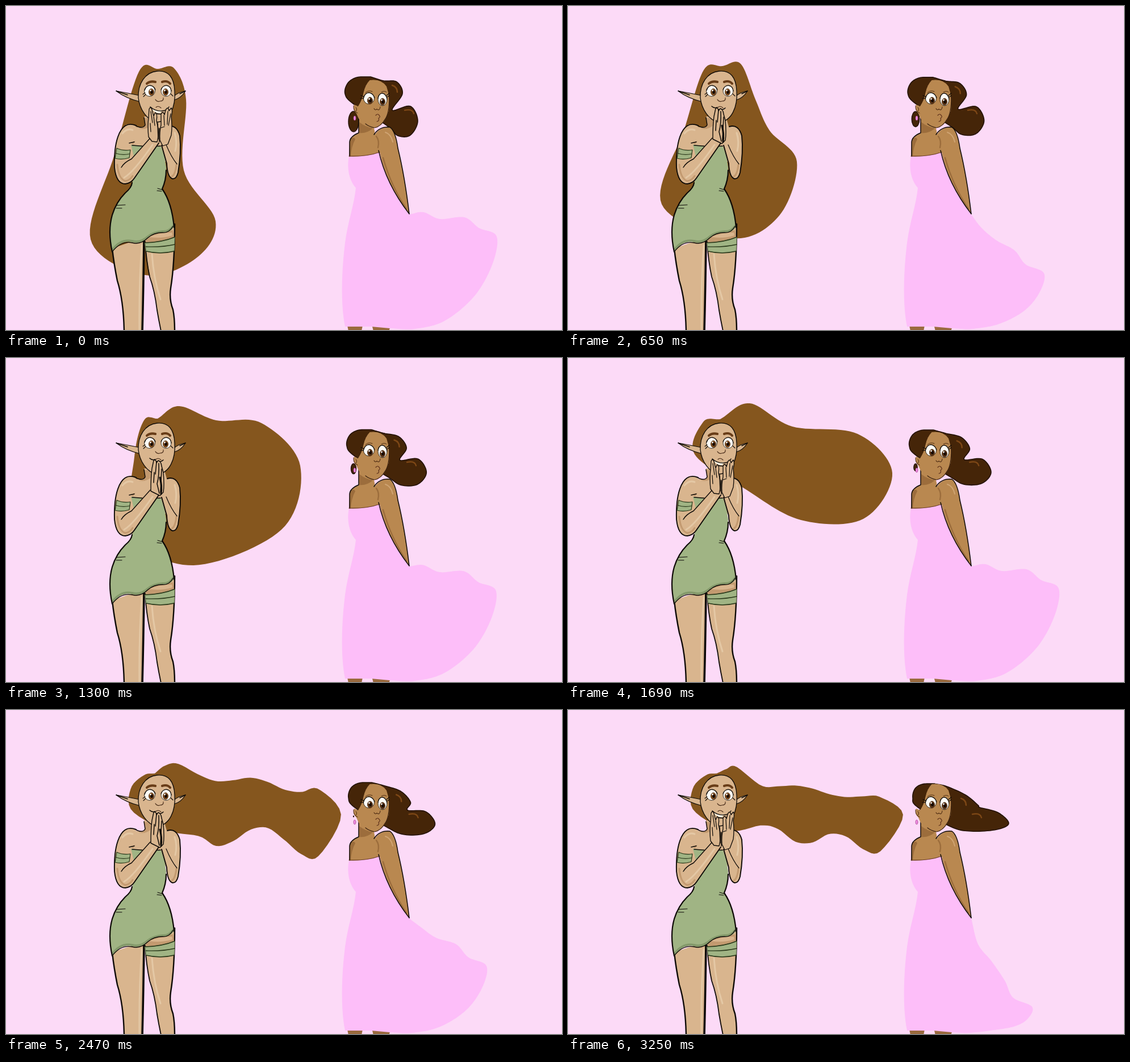
Animation of 979x572 px, one loop 3.38 s. Source, as an HTML page with a canvas:

```html
<!DOCTYPE html>
<html lang="en">
<head>
<meta charset="utf-8">
<title>Windblown</title>
<style>
html, body { margin: 0; width: 100%; height: 100%; overflow: hidden; background: #fcdaf7; }
canvas { display: block; }
</style>
</head>
<body>
<canvas id="stage" width="979" height="572"></canvas>
<script>
const ctx = document.getElementById('stage').getContext('2d');
const STEP = 130, STEPS = 26, TAU = 2 * Math.PI;
const INK = '#0d0906', SKIN = '#d9b58e', SKIN_LIGHT = '#e4c8a5', SKIN_DARK = '#c39a70';
const GREEN = '#a0b484', GREEN_DARK = '#83996a', HAIR = '#85561e';
const TAN = '#b98850', TAN_DARK = '#9c6d3c', TAN_SHINE = '#cfa473';
const CURLS = '#452508', CURLS_INK = '#211003', SHINE = '#7d4716', GOWN = '#fdbef9';

const mix = (a, b, k) => a + (b - a) * k;
const mixPoints = (a, b, k) => a.map((p, i) => [mix(p[0], b[i][0], k), mix(p[1], b[i][1], k)]);
const ease = k => (1 - Math.cos(Math.PI * k)) / 2;
const points = text => text.split(' ').map(pair => pair.split(',').map(Number));

// Value at a time between [time, value] keys.
function between(keys, time, blend) {
  const i = Math.max(1, keys.findIndex(key => key[0] >= time));
  const [t0, a] = keys[i - 1], [t1, b] = keys[i];
  return blend(a, b, (time - t0) / (t1 - t0));
}

// Evenly samples a smooth curve through the given points.
function smooth(pts, samples = 140) {
  const last = pts.length - 1;
  return Array.from({ length: samples + 1 }, (_, n) => {
    const pos = n / samples * last, i = Math.min(last - 1, Math.floor(pos)), k = pos - i;
    const q = pts[i], r = pts[i + 1];
    const p = pts[i - 1] || mixPoints([r], [q], 2)[0];
    const s = pts[i + 2] || mixPoints([q], [r], 2)[0];
    return q.map((v, d) => v + k / 2 * (r[d] - p[d]
      + k * (2 * p[d] - 5 * v + 4 * r[d] - s[d] + k * (3 * (v - r[d]) + s[d] - p[d]))));
  });
}
const ring = pts => smooth([...pts, pts[0]]);

// Long hair: hangs, lifts and fills with wind, then streams out as a rippling ribbon.
const hang = ring(points('268,111 296,110 317,165 313,290 369,380 335,445 245,475 149,412 191,262 234,116'));
const lift = ring(points('272,106 304,102 330,165 355,220 403,275 372,370 290,410 165,350 205,217 239,113'));
const blow = ring(points('267,107 305,85 370,110 450,115 518,190 485,303 330,366 222,310 226,175 243,110'));
const gust = ring(points('268,108 320,80 395,121 510,134 571,203 520,284 410,286 310,230 223,170 238,113'));

function stream(t) {
  const age = t - 16;
  const xs = Array.from({ length: 8 }, (_, i) => 340 + 30 * i);
  const upper = xs.map(x => [x, 122 + 2.5 * age + .14 * (x - 452)
    - (9 - .5 * age) * Math.cos(TAU * (x - 452 + 4.5 * age) / 134)]);
  const lower = xs.map(x => [x, 238 + .12 * (x - 535)
    + (26 - 1.4 * age) * Math.cos(TAU * (x - 535) / (185 - 7 * age))]);
  const top = 92 + .9 * age;
  return ring([[262, 112], [279, top + 4], [305 - age, top], ...upper, [590, 186], ...lower.reverse(),
    [285, 213], [222, 178], [220, 138], [243, 115]]);
}
const hairKeys = [[0, hang], [5, lift], [10, blow], [13, gust], [16, stream(16)]];

// Gown hem: swings between a raised and a dropped position.
const hemUp = points('735,364 764,376 807,373 833,392 864,407 856,457 824,513 772,556 720,570');
const hemDown = points('725,402 750,428 778,454 795,481 828,497 820,525 795,548 755,563 710,570');
const dropKeys = [[0, 0], [5, .72], [10, .04], [13, 0], [16, 1], [22, 0], [25, 1.3]];

// Tied-back curls: a round bun stretched by the wind.
const bunCalm = points('642,125 665,132 688,134 698,155 680,184 712,177 725,203 712,228 690,229 672,212 612,173 597,155 602,136 618,126');
const bunBlown = points('645,130 667,135 700,150 722,168 725,172 757,181 776,200 755,211 710,214 674,206 615,171 607,155 611,139 624,131');

function trace(pts) {
  const path = new Path2D();
  pts.forEach(([x, y]) => path.lineTo(x, y));
  path.closePath();
  return path;
}

function shape(d, fill, ink, width = 1.5) {
  const path = typeof d === 'string' ? new Path2D(d) : d;
  if (fill) { ctx.fillStyle = fill; ctx.fill(path); }
  if (ink) { ctx.strokeStyle = ink; ctx.lineWidth = width; ctx.stroke(path); }
}
const line = (d, width = 1.5, ink = INK) => shape(d, null, ink, width);

function oval(x, y, rx, ry, fill, ink, width = 1) {
  const path = new Path2D();
  path.ellipse(x, y, rx, ry, 0, 0, TAU);
  shape(path, fill, ink, width);
}

function eye(x, y, rx, ry, px, py, iris) {
  oval(x, y, rx, ry, '#fffdf6', INK, .8);
  oval(px, py, 4.5, 6, iris, '#3a1d0a', .8);
  oval(px + .5, py, 2.4, 3.2, '#160a04');
  oval(px - 1.5, py - 3, 1.3, 1.5, '#fff');
}

function elfBody() {
  shape('M243 195L245 211Q240 218 212 209L205 220 220 275 290 275 304 222Q298 211 283 213L278 195Z', SKIN);
  shape('M243 197L245 211Q240 218 230 215Q250 223 263 201Z', SKIN_DARK);
  line('M243 197L245 210Q241 218 228 211');

  shape('M187 428Q190 455 196 485Q207 520 208 574H240Q243 495 244 408Z', SKIN);
  shape('M244 405Q247 445 253 475Q262 500 266 535Q269 555 273 574H298Q297 550 294 536Q287 518 290 498Q297 455 297 385Z', SKIN);
  line('M239 422Q234 495 235 574', 3, SKIN_LIGHT);
  line('M257 438Q260 482 272 518', 3, SKIN_LIGHT);
  line('M187 428Q190 455 196 485Q207 520 208 574', 2.4);
  line('M243 412Q242 500 240 574', 3.6);
  line('M245 416Q247 450 253 478Q262 503 266 537Q269 555 273 574', 1.8);
  line('M297 385Q297 455 290 498Q287 518 294 536Q297 550 297 574', 2.4);

  shape('M246 408Q262 398 294 396L296 410Q275 418 246 417Z', SKIN_DARK);
  shape('M252 408Q270 400 292 400L293 405Q275 411 252 408Z', SKIN);
  shape('M245 418Q276 417 297 408L296 432Q268 439 247 433Z', GREEN, GREEN_DARK, 1);
  line('M245 418Q276 417 297 408M246 425Q276 426 297 421M247 433Q272 439 296 433', 1.4, '#293719');

  shape('M220 245Q250 249 276 247L282 285Q282 307 275 323Q292 347 295 389Q288 399 276 398Q260 399 250 408Q237 420 222 416Q202 412 187 434Q179 397 187 369Q194 346 210 330Q221 321 222 313L230 285Z', GREEN);
  line('M294 389Q287 399 276 398Q260 399 250 407Q237 419 222 415Q202 411 188 430', 4, GREEN_DARK);
  line('M294 389Q287 401 276 400Q260 400 250 409Q237 422 222 418Q202 414 187 434', 1.4);
  line('M222 312Q221 321 210 330Q194 346 187 369Q179 397 187 434', 2.2);
  line('M282 290Q282 307 275 323Q292 347 296 391', 2.2);
  line('M195 352L210 351M194 357L204 357M267 322L277 325M266 326L274 327', 1.1);
  line('M222 246Q250 249 277 247', 1.3);
}

function elfArms() {
  shape('M284 213Q300 208 306 229Q309 258 303 294Q300 306 293 305Q284 302 283 278L271 242 285 232Z', SKIN);
  line('M297 224Q302 240 298 256', 3, SKIN_LIGHT);
  line('M300 280Q298 298 292 301', 3, SKIN_DARK);
  line('M284 213Q300 208 306 229Q309 258 303 294Q300 306 293 305Q284 302 283 278L274 246', 1.9);
  line('M282 245Q291 267 301 279', 1.2);

  shape('M229 211Q207 202 197 231Q190 251 191 285Q194 314 210 314Q220 313 226 304L270 242 252 233 222 269 219 245Z', SKIN);
  line('M205 225Q213 215 223 219', 3, SKIN_LIGHT);
  line('M208 303Q224 294 258 245', 3, SKIN_LIGHT);
  line('M196 280Q198 305 210 309Q218 308 223 300', 3, SKIN_DARK);
  shape('M219 241L228 238 224 244Z', SKIN_DARK);
  line('M229 211Q207 202 197 231Q190 251 191 285Q194 314 210 314Q220 313 226 304L269 242', 1.9);
  line('M254 233L221 270Q208 276 203 285M217 242L226 240', 1.4);
  shape('M195 251Q205 256 219 254L217 268Q204 272 192 269Z', GREEN, '#293719', 1.2);
  line('M193 260Q205 264 218 261', 1.2, '#293719');
}

function elfHead(clapped) {
  shape('M235 158Q216 154 194 150Q211 163 236 169Z', SKIN, INK, 1.2);
  shape('M295 160Q303 152 316 150Q308 163 296 166Z', SKIN, INK, 1.2);
  line('M194 150L214 157M316 150L306 155', 1.4);
  shape('M266 115C286 113 296 126 297 150C299 178 288 204 266 205C248 203 235 181 233 162C232 137 245 117 266 115Z', SKIN, INK, 1.3);
  line('M248 137Q254 132 263 134M275 134Q284 131 289 137', 4.2, '#693d18');
  eye(253, 150, 9.5, 9.5, 256, 152, '#85501f');
  eye(282, 150, 9, 9.5, 281, 152, '#85501f');
  line('M244 149Q247 140 254 140Q261 141 263 148M273 148Q275 141 282 140Q290 141 291 150', 1.2);
  line('M246 156L242 160M245 153L241 156M290 155L294 159', 1.1);
  line('M263 165Q266 170 271 168Q278 168 277 162M264 179Q268 175 273 180', 1.1, '#442817');
  if (clapped) {
    line('M253 177Q257 181 263 179M264 182Q270 186 277 180', 1.5);
  } else {
    shape('M256 180Q262 186 275 184L271 189Q262 190 256 180Z', '#fff9e9');
    line('M254 178Q264 187 277 185Q284 184 287 178M262 189Q270 192 279 190', 1.4);
  }
}

function elfHands(clapped) {
  if (clapped) {
    shape('M255 235Q255 210 257 195L260 181Q264 178 265 185L268 181Q273 182 274 191L277 202Q279 224 277 237L271 243Z', SKIN, INK, 1.4);
    line('M265 184L263 205M269 186Q270 208 266 222L270 239M261 202L260 220M274 196L272 237', 1.5);
    line('M271 211Q275 226 273 240', 3);
    return;
  }
  shape('M251 231Q249 213 251 197L252 182Q255 176 257 183L260 194 263 188Q267 190 265 202L268 216Q269 231 266 240L257 239Z', SKIN, INK, 1.3);
  shape('M271 237Q270 222 273 210L273 191Q276 184 279 192L281 184Q285 176 287 185L291 180Q294 184 291 195Q293 212 291 228L285 244 276 247Z', SKIN, INK, 1.3);
  line('M255 186L258 206M260 195L262 211M254 207L255 222M278 193L279 211M285 186L284 209M290 190L286 211M273 215L279 213', 1.2);
  line('M267 207L268 235M270 216L270 240', 1.5);
}

function ladyCurls(t) {
  const u = t / (STEPS - 1);
  const lock = Math.max(0, 1 - u / .8);
  if (lock) oval(612, 187 + 17 * lock, 9 * lock, 18 * lock, CURLS, CURLS_INK, 1.4);
  const bun = mixPoints(bunCalm, bunBlown, .75 * u + .25 * u ** 8);
  shape(trace(ring(bun)), CURLS, CURLS_INK, 1.6);
  const [x, y] = bun[2];
  line(`M${x - 8} ${y + 6}Q${x + 1} ${y + 9} ${x + 1} ${y + 18}`, 2.6, SHINE);
  const tail = 710 + 10 * u;
  line(`M${tail - 8} 184Q${tail + 6} 181 ${tail + 8} 190`, 2.4, SHINE);
}

function ladyGown(t) {
  const hem = mixPoints(hemUp, hemDown, between(dropKeys, t, (a, b, k) => mix(a, b, ease(k))));
  const gown = new Path2D('M604 266Q636 266 658 258Q669 314 710 368');
  smooth([[710, 368], ...hem, [676, 569]]).forEach(([x, y]) => gown.lineTo(x, y));
  gown.lineTo(643, 566);
  gown.lineTo(597, 566);
  gown.bezierCurveTo(589, 525, 591, 467, 597, 418);
  gown.bezierCurveTo(602, 380, 613, 352, 616, 321);
  gown.bezierCurveTo(603, 307, 600, 282, 604, 266);
  shape(gown, GOWN);
}

function lady(t) {
  shape('M601 564H628L626 574H603ZM645 566H677L674 574H647Z', '#9a6a3e');
  ladyCurls(t);

  shape('M621 190L621 225Q606 230 605 240L604 270 660 262 656 257Q669 314 710 367Q702 300 690 251Q685 219 676 214Q661 212 650 226L646 205Z', TAN);
  shape('M622 205L622 224Q634 226 646 216Q632 213 622 205Z', TAN_DARK);
  shape('M606 234Q613 230 615 235Q608 248 607 267L604 268Z', TAN_DARK);
  line('M655 250Q658 238 652 230M664 268Q678 318 705 358', 2.4, TAN_DARK);
  line('M668 223Q678 226 681 240', 2, TAN_SHINE);
  line('M621 188L621 224Q606 230 605 240L605 267M648 227Q658 212 676 214Q686 221 690 251Q702 300 710 367', 1.5);

  ladyGown(t);
  line('M604 265Q636 266 658 258', 1.2, '#6c4028');
  line('M656 255Q669 314 710 367', 1.4);

  shape('M640 131Q661 128 670 142Q677 162 674 185Q666 211 650 215Q633 211 621 199L617 190Q610 183 613 174L620 177Q627 166 629 153Q632 139 640 131Z', TAN);
  line('M675 160Q675 189 668 199Q660 213 649 215Q639 213 633 208', 1.2, '#39200e');
  line('M640 131Q632 139 629 153Q627 166 619 177M612 176Q611 186 619 189M616 179Q619 182 616 186', 1, '#422409');
  eye(639, 163, 9.5, 10, 641, 167, '#613817');
  eye(663, 165, 8, 11, 663, 169, '#613817');
  line('M629 164Q632 153 639 153Q646 154 649 162M655 163Q656 154 663 154Q669 156 671 164', 1.2);
  line('M630 160L625 158M629 163L624 163M670 158L675 154M671 161L675 158', 1.1);
  line('M633 153Q638 148 645 151M661 152Q666 149 670 152', 1, '#4a290f');
  line('M648 181Q650 185 653 182Q658 186 659 178', 1.1, '#4c2a12');
  line('M651 193Q655 189 657 193Q660 196 656 198Q658 203 653 204', 1.2, '#5d301b');
  oval(614, 198, 2, 4, '#f18de4', '#a84b91', .8);
}

function draw(t) {
  const beat = t % 4.5;
  const clapped = beat > .4 && beat < 2.3;
  ctx.fillStyle = '#fcdaf7';
  ctx.fillRect(0, 0, 979, 572);
  ctx.lineCap = ctx.lineJoin = 'round';
  shape(trace(t > 16 ? stream(t) : between(hairKeys, t, mixPoints)), HAIR);
  elfBody();
  elfArms();
  elfHead(clapped);
  elfHands(clapped);
  lady(t);
}

function tick() {
  draw(Math.floor(performance.now() / STEP) % STEPS);
  requestAnimationFrame(tick);
}
tick();
</script>
</body>
</html>
```
